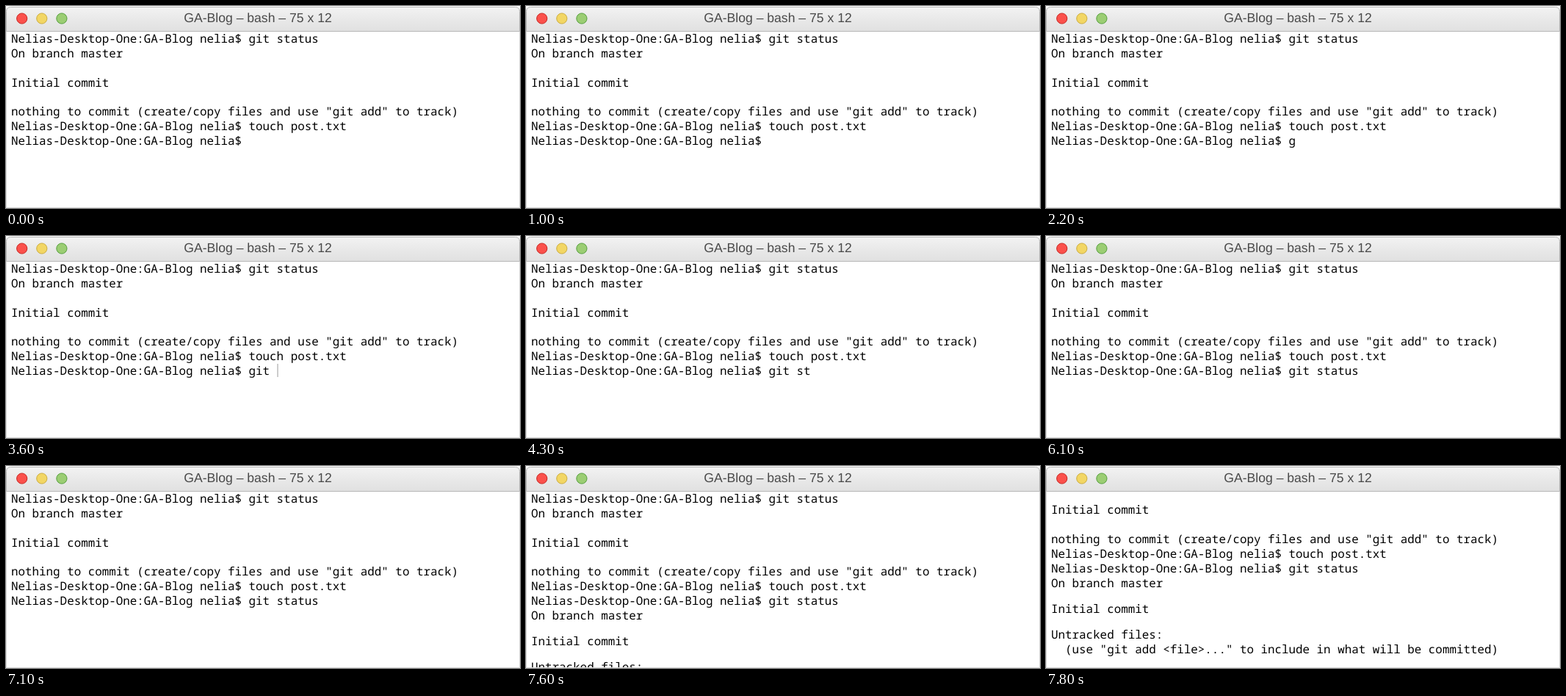
An HTML page that plays this animation: 700 px wide and 275 px high, repeating every 8 s.

```html
<!DOCTYPE html>
<html lang="en">
<head>
<meta charset="utf-8">
<title>Terminal</title>
<style>
  html, body { margin: 0; height: 100%; overflow: hidden; background: #fff; }
  svg { display: block; width: 700px; height: 275px; }
  text { text-rendering: geometricPrecision; white-space: pre; }
  #lines { font: 15.86px "Noto Sans Mono", monospace; fill: #000; }
  #title { font: 17.6px "Liberation Sans", Arial, sans-serif; fill: #4a4a4a; }
</style>
</head>
<body>
<svg viewBox="0 0 700 275">
  <defs>
    <linearGradient id="bar" x2="0" y2="1">
      <stop stop-color="#f2f2f2"/>
      <stop offset="1" stop-color="#e0e0e0"/>
    </linearGradient>
    <clipPath id="body"><rect y="35" width="700" height="239"/></clipPath>
  </defs>
  <g clip-path="url(#body)">
    <g id="lines"></g>
    <rect id="cursor" y="174" width="1" height="18" fill="#999"/>
  </g>
  <path d="M.5 34V274.5H699.5V34" fill="none" stroke="#dcdcdc"/>
  <path d="M.5 34.5V7.5Q.5 1.5 6.5 1.5H693.5Q699.5 1.5 699.5 7.5V34.5Z" fill="url(#bar)" stroke="#b8b8b8"/>
  <circle cx="21.7" cy="17" r="7.1" fill="#fb514c" stroke="#c9241f"/>
  <circle cx="48.8" cy="17" r="7.1" fill="#f2d664" stroke="#cdad3c"/>
  <circle cx="75.9" cy="17" r="7.1" fill="#9bcd73" stroke="#55a03c"/>
  <text id="title" x="343" y="22" text-anchor="middle">GA-Blog – bash – 75 x 12</text>
</svg>
<script>
const LOOP = 8000, OUTPUT_AT = 7600, SCROLL_AT = 7800, SCROLL = 44.2;
const COMMAND = 'git status';
const PROMPT = 'Nelias-Desktop-One:GA-Blog nelia$ ';
const $ = id => document.getElementById(id);

function addLine(y, content) {
  const line = document.createElementNS('http://www.w3.org/2000/svg', 'text');
  line.setAttribute('x', 7);
  line.setAttribute('y', y);
  line.textContent = content;
  return $('lines').appendChild(line);
}

addLine(50.3, PROMPT + COMMAND);
addLine(70.1, 'On branch master');
addLine(109.7, 'Initial commit');
addLine(149.3, 'nothing to commit (create/copy files and use "git add" to track)');
addLine(169.1, PROMPT + 'touch post.txt');
const input = addLine(189, PROMPT);
const output = [
  addLine(209, 'On branch master'),
  addLine(244, 'Initial commit'),
  addLine(279, 'Untracked files:'),
  addLine(299, '  (use "git add <file>..." to include in what will be committed)'),
];

// When each character of the command appears
const keyTimes = [2200, 2400, 2600, 3600, 4100, 4300, 4500, 4700, 4900, 5100];
// Cursor visibility: [from, to, x]
const blinks = [
  [500, 1000, 331.5], [1500, 2000, 331.5],
  [3100, 3600, 356.5], [3600, 4100, 369.5],
  [5600, 6100, 425], [6600, 7100, 425],
];

function render(now) {
  const t = now % LOOP;
  input.textContent = PROMPT + COMMAND.slice(0, keyTimes.filter(k => k <= t).length);
  const blink = blinks.find(([from, to]) => t >= from && t < to);
  $('cursor').setAttribute('visibility', blink ? 'visible' : 'hidden');
  if (blink) $('cursor').setAttribute('x', blink[2]);
  for (const line of output) line.setAttribute('visibility', t >= OUTPUT_AT ? 'visible' : 'hidden');
  $('lines').setAttribute('transform', `translate(0 ${t >= SCROLL_AT ? -SCROLL : 0})`);
}

const start = performance.now();
function tick() {
  render(performance.now() - start);
  requestAnimationFrame(tick);
}
tick();
</script>
</body>
</html>
```
